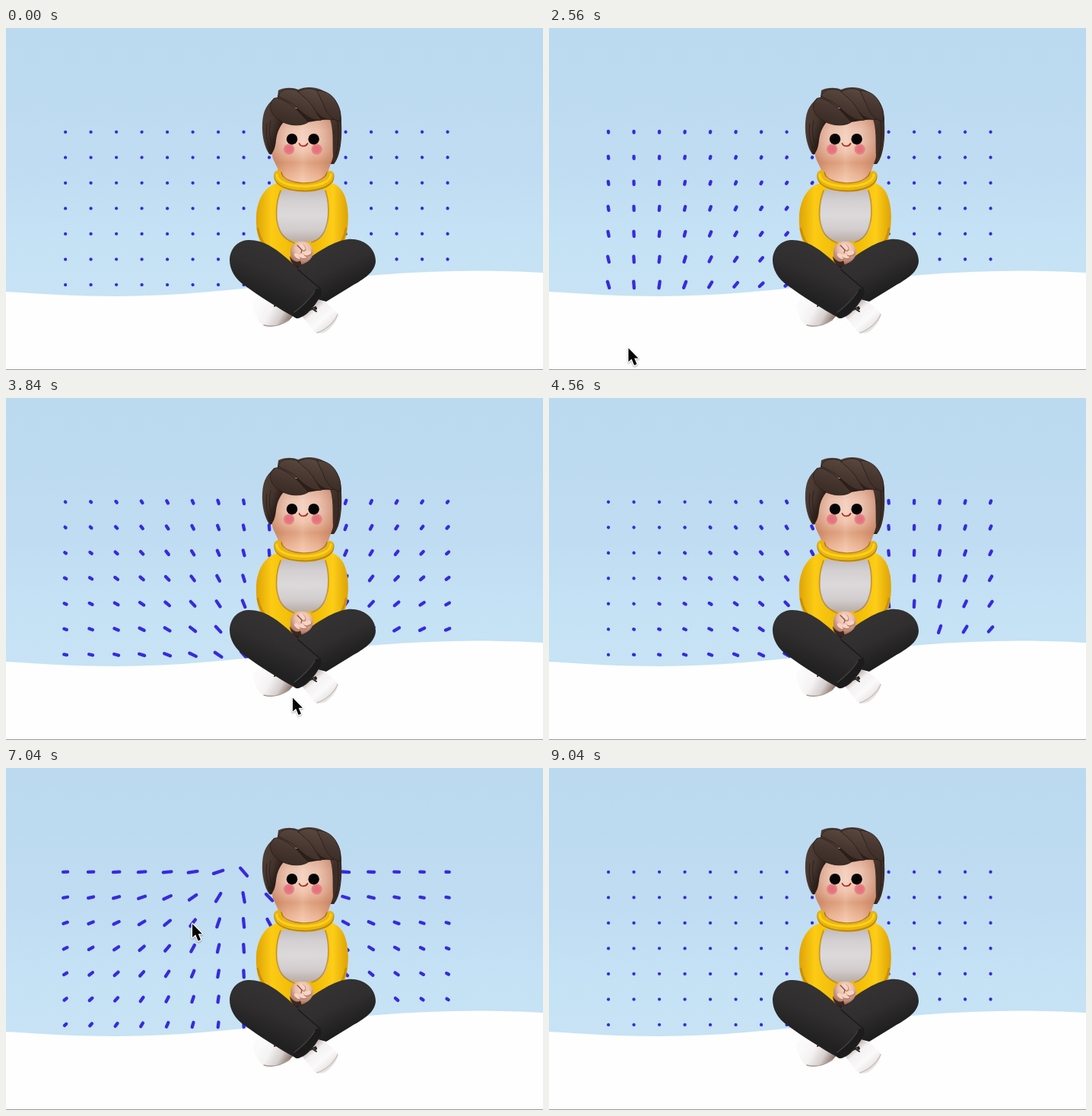
An HTML page with a canvas that plays this animation: 706x450 px, repeating every 9.12 s.

```html
<!DOCTYPE html>
<html lang="en">
<head>
<meta charset="utf-8">
<title>Magnetic dash grid</title>
<style>
html, body { margin: 0; width: 100%; height: 100%; overflow: hidden; background: #fefefe; }
canvas { display: block; width: 706px; height: 450px; }
</style>
</head>
<body>
<canvas id="stage" width="706" height="450"></canvas>
<script>
const W = 706, H = 450, LOOP = 9120, STEP = 80;
const LAG = 100, REACH = 400;
const ctx = document.getElementById('stage').getContext('2d');

// Pointer route as [ms, x, y]; it leaves the stage through the bottom edge
const route = [
  [0, 150, 1300], [1660, 190, 670], [2480, 120, 480], [2720, 85, 260],
  [2900, 190, 195], [3020, 288, 247], [3120, 280, 332], [3360, 310, 385],
  [4000, 400, 398], [4460, 470, 430], [4560, 500, 453], [4800, 557, 453],
  [6400, 557, 453], [6640, 605, 453], [6720, 628, 255], [6940, 305, 128],
  [7040, 245, 205], [7280, 125, 440], [8000, 125, 800], [LOOP, 150, 1300]
];

// Smooth curve through the route
function pointerAt(time) {
  const t = (time + LOOP) % LOOP;
  let i = 0;
  while (t >= route[i + 1][0]) i++;
  const a = route[i], b = route[i + 1];
  const before = route[i - 1] || a, after = route[i + 2] || b;
  const span = b[0] - a[0], u = (t - a[0]) / span;
  return [1, 2].map(k => {
    const m0 = (b[k] - before[k]) / (b[0] - before[0]) * span;
    const m1 = (after[k] - a[k]) / (after[0] - a[0]) * span;
    const u2 = u * u, u3 = u2 * u;
    return (2 * u3 - 3 * u2 + 1) * a[k] + (u3 - 2 * u2 + u) * m0
      + (3 * u2 - 2 * u3) * b[k] + (u3 - u2) * m1;
  });
}

function addStops(g, colors) {
  colors.forEach((c, i) => g.addColorStop(i / (colors.length - 1), c));
  return g;
}
const linear = (x0, y0, x1, y1, ...colors) =>
  addStops(ctx.createLinearGradient(x0, y0, x1, y1), colors);
const radial = (x, y, r, ...colors) =>
  addStops(ctx.createRadialGradient(x, y, 0, x, y, r), colors);

function fill(d, paint) {
  ctx.fillStyle = paint;
  ctx.fill(new Path2D(d));
}
function line(d, paint, width) {
  ctx.strokeStyle = paint;
  ctx.lineWidth = width;
  ctx.stroke(new Path2D(d));
}
function oval(x, y, rx, ry, paint, turn = 0) {
  ctx.beginPath();
  ctx.ellipse(x, y, rx, ry, turn, 0, Math.PI * 2);
  ctx.fillStyle = paint;
  ctx.fill();
}

function drawSky() {
  ctx.fillStyle = linear(0, 0, 0, 360, '#bbdaef', '#bddbf0', '#c0dcf2', '#c5e1f5', '#c7e3f4');
  ctx.fillRect(0, 0, W, H);
}

function drawHill() {
  fill('M0 347C50 350 95 353 145 353C300 353 440 319.5 620 319.5C650 319.5 680 320.5 706 322V450H0Z', '#fefefe');
  ctx.fillStyle = '#999';
  ctx.fillRect(0, 449, W, 1);
}

// Every dash points at the focus and shrinks to a dot with distance
function drawGrid([fx, fy]) {
  ctx.strokeStyle = '#372bdc';
  ctx.lineWidth = 4.3;
  for (let col = 0; col < 16; col++) {
    for (let row = 0; row < 7; row++) {
      const x = 78.1 + col * 33.5, y = 136.8 + row * 33.5;
      const dx = fx - x, dy = fy - y, d = Math.hypot(dx, dy) || 1;
      const half = Math.max(0.01, 7 * (1 - d / REACH));
      const ex = dx / d * half, ey = dy / d * half;
      ctx.beginPath();
      ctx.moveTo(x - ex, y - ey);
      ctx.lineTo(x + ex, y + ey);
      ctx.stroke();
    }
  }
}

function drawShoes() {
  fill('M341 354C332 356 325 360 325 366C327 378 332 388 338 391C348 395 362 391 372 385L380 376L362 356Z',
    linear(336, 362, 376, 384, '#fbfafa', '#f4f2f2', '#d5cfcd', '#7d6459'));
  line('M339 391C350 394 362 391 372 384', '#a89a94', 1.3);
  fill('M408 357C420 359 430 368 436 376C437 383 430 393 420 400C414 403 408 402 405 399L389 379Z',
    linear(396, 364, 424, 396, '#a5948c', '#f3f1f1', '#fbfafa', '#e6e2e1'));
  line('M436 377C432 387 421 397 409 401', '#c6bfbc', 1.4);
  for (const [x, y] of [[356, 364], [403, 369]]) {
    line(`M${x - 4} ${y - 2}L${x + 5} ${y + 4}M${x - 3} ${y + 2}L${x + 4} ${y - 2}`, '#262122', 2);
    oval(x + 4, y, 2, 2, '#262122');
  }
}

function drawLegs() {
  fill('M370 308L388 313L408 304L402 332H380Z', '#201c1c');
  fill('M384 315C402 299 428 281 449 278C468 276 486 288 486 307C485 323 467 332 452 341L421 360L390 352Z',
    linear(425, 285, 452, 342, '#343233', '#302e2f', '#1f1e1f'));
  fill('M318 279C336 278 352 288 368 302L414 344C418 350 398 382 382 382C358 369 332 352 314 339C301 330 294 318 294 305C295 290 304 280 318 279Z',
    linear(348, 286, 322, 346, '#343233', '#302e2f', '#222122'));
  line('M384 318L414 344', '#1b1a1b', 1.5);
  line('M383 377C392 372 406 358 410 348', '#1d1c1d', 10);
  line('M379 374C389 367 401 355 406 346', '#444142', 1.2);
}

function drawBody() {
  const yellow = linear(329, 0, 450, 0, '#dfa406', '#fccb14', '#f3c00b', '#e9b208', '#f3bf08', '#fdcd18', '#dda205');
  fill('M357 204C341 208 331 224 329 246C328 270 333 287 349 299C358 306 369 309 377 310L402 306C423 304 440 292 446 278C452 257 451 231 443 216C438 208 430 203 424 203Z', yellow);
  line('M331 264C335 286 350 300 375 308M447 264C444 286 427 300 404 304', 'rgba(170,110,0,.45)', 3);
  fill('M364 212C357 220 355 237 356 252C357 268 363 277 376 281H405C417 277 423 267 423 252C425 236 424 221 418 212Z',
    linear(0, 210, 0, 284, '#bfb8b8', '#d5d1d3', '#dcd9db', '#d2cccd', '#b3a8a2'));
  line('M361 214C355 229 354 249 358 261C361 273 369 279 379 283M420 214C425 229 425 249 421 261C418 272 411 279 402 282', 'rgba(170,108,6,.55)', 1.8);
}

function drawHands() {
  fill('M374 293C375 285 382 280 390 281C398 281 404 287 404 295C403 305 395 309 389 311C381 313 373 305 374 293Z',
    radial(390, 290, 20, '#fbdccd', '#e9bda9', '#a8705c'));
  fill('M373 300C378 308 383 309 387 306L389 313C382 316 374 311 373 300Z', '#3a2722');
  for (const [x, y, turn] of [[384, 301, .6], [391, 301, .2], [397, 297, -.3], [390, 289, .9]]) {
    oval(x, y, 5.5, 3.7, '#b9816c', turn);
    oval(x - .5, y - 1, 5, 2.9, '#f6d3c4', turn);
  }
  line('M383 286L389 292L388 296', '#86503f', 1.2);
}

function drawHead() {
  fill('M346 166C340 157 336 142 337 125C338 108 344 97 357 91L358 82C366 78 377 78 384 81C397 75 417 78 426 90C437 95 441 109 441 126C442 145 440 169 431 179L426 179V115H354V166Z',
    linear(340, 80, 440, 170, '#4b3931', '#503e36', '#40302a', '#352721'));
  const face = 'M354 105C350 140 347 163 352 174C357 184 361 192 361 206H422C421 193 425 184 429 173C433 158 431 135 429 105Z';
  fill(face, linear(0, 120, 0, 206, '#e2b29d', '#f1cbb9', '#f4d0bf', '#efc0a8', '#dd9f7c', '#eeb797', '#f6ccb5'));
  fill(face, linear(349, 0, 431, 0, 'rgba(170,95,65,.5)', 'rgba(190,115,80,.12)',
    'rgba(255,230,215,.2)', 'rgba(190,115,80,.12)', 'rgba(170,95,65,.5)'));

  for (const x of [372, 408.6]) oval(x, 159.6, 7.2, 7.2, radial(x, 159.6, 7.2, '#e96f7c', '#e5747f', '#e58a8c'));
  for (const x of [376, 404.6]) oval(x, 146.2, 7.2, 7.2, '#050405');
  line('M385.5 152C387.5 156.5 394 156.5 396.5 152', '#a52c22', 1.8);
}

function drawFringe() {
  const dark = '#2b1f1a', mid = '#483730', light = '#5a4940';
  fill('M341 118C345 105 350 98 357 95L370 119C361 126 356 137 355 148C354 157 352 163 348 167C338 152 336 132 341 118Z',
    linear(338, 130, 358, 138, '#4c3b33', '#44342d', dark));
  fill('M425 88C436 97 441 109 441 125C441 145 440 166 431 179C428 160 432 138 426 120L412 102Z',
    linear(424, 110, 441, 120, '#33251f', mid, '#3c2d27'));
  const locks = [
    'M352 93C345 99 346 110 355 118C366 128 386 131 397 124C389 115 379 101 362 94C358 92 355 91 352 93Z',
    'M358 90C359 79 378 78 388 85C401 92 406 111 415 121C403 123 392 114 383 105C376 98 366 94 358 90Z',
    'M384 84C395 76 411 79 416 91C419 104 425 115 433 120C419 122 411 116 405 106C399 96 392 91 384 84Z',
    'M409 82C423 82 432 91 436 101C441 110 440 118 439 123C427 121 421 111 417 100Z'
  ];
  fill('M380 106L397 124L415 121L433 120L420 100Z', dark);
  locks.forEach((d, i) => {
    const x = 352 + i * 22;
    fill(d, linear(x + 20, 82, x + 8, 126, light, mid, '#382a24'));
    line(d, dark, .9);
  });
  line('M343 126C341 138 343 150 347 159M348 122C345 136 347 147 350 155M436 122C438 140 437 158 433 170', dark, .9);
}

function drawCollar() {
  line('M358 193C354 215 428 216 426 194', '#c08604', 11);
  line('M358 192C354 214 427 214 426 193', '#eab609', 9.5);
  line('M356 193C356 213 426 214 427 193', '#fbd022', 3);
  line('M362 190C365 208 417 209 422 190', 'rgba(150,88,0,.6)', 1.4);
}

function drawCursor([x, y]) {
  if (y > H) return;
  const arrow = new Path2D('M0 0V18L4.2 14.3L7.6 22.5L11 21L7.7 13.2H13Z');
  ctx.save();
  ctx.translate(x, y);
  ctx.shadowColor = 'rgba(0,0,0,.35)';
  ctx.shadowBlur = 2;
  ctx.shadowOffsetY = 1;
  ctx.strokeStyle = '#fff';
  ctx.lineWidth = 2.6;
  ctx.stroke(arrow);
  ctx.shadowColor = 'transparent';
  ctx.fillStyle = '#050505';
  ctx.fill(arrow);
  ctx.restore();
}

function draw(t) {
  ctx.lineCap = ctx.lineJoin = 'round';
  drawSky();
  drawGrid(pointerAt(t - LAG));
  drawHill();
  drawShoes();
  drawBody();
  drawLegs();
  drawHands();
  drawHead();
  drawFringe();
  drawCollar();
  drawCursor(pointerAt(t));
}

const start = performance.now();
function tick() {
  const t = (performance.now() - start) % LOOP;
  draw(Math.floor(t / STEP) * STEP);
  requestAnimationFrame(tick);
}
tick();
</script>
</body>
</html>
```
